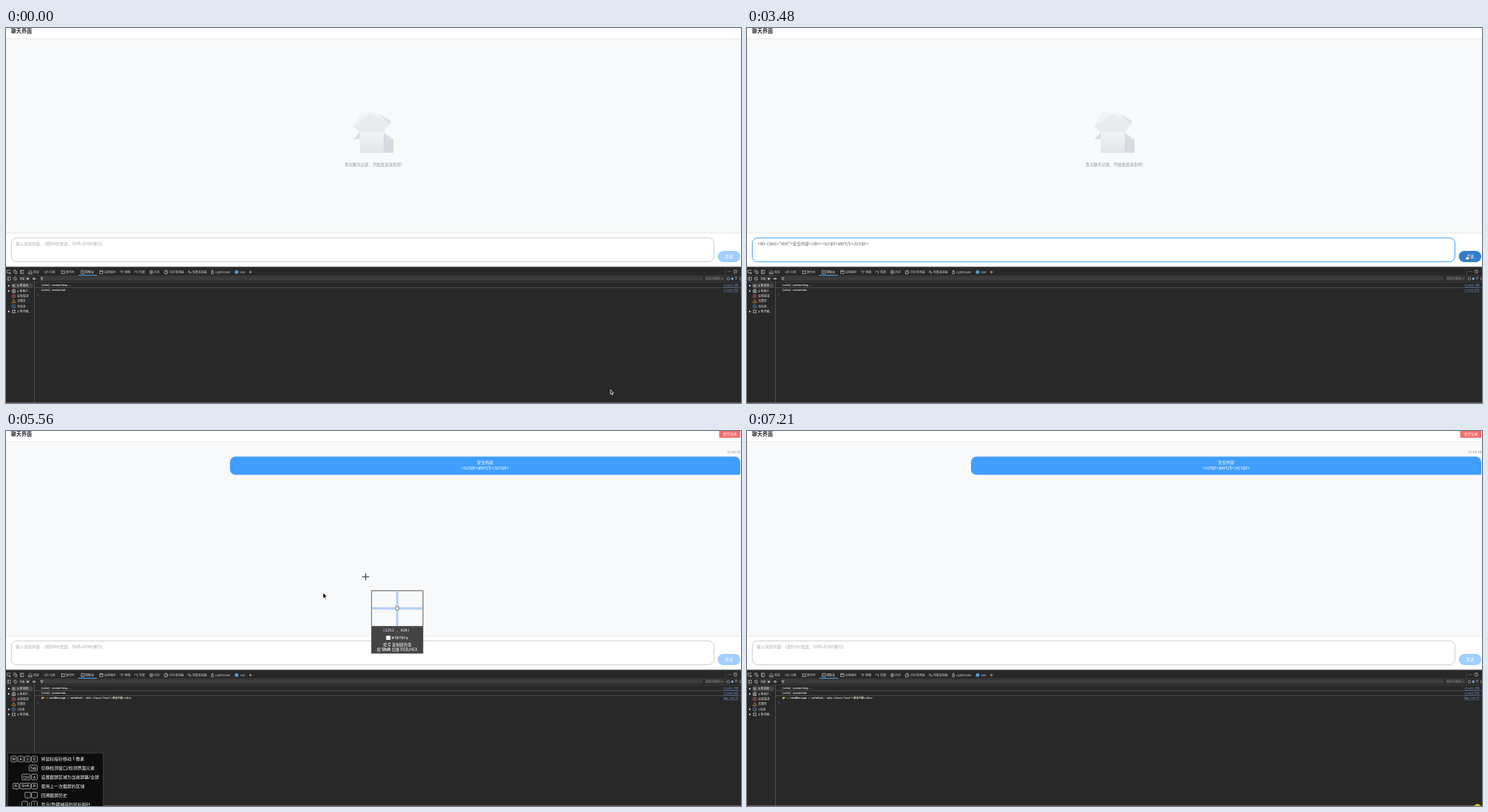
Write an HTML page that moves like this. It is 1047 px wide and 535 px high and loops after 7280 ms.

```html
<!DOCTYPE html>
<html lang="zh-CN">
<head>
<meta charset="utf-8">
<title>聊天界面</title>
<style>
html, body { margin: 0; width: 100%; height: 100%; overflow: hidden; background: #fff; }
svg { display: block; width: 100vw; height: 100vh; }
text { font-family: Inter, "Noto Sans CJK SC", "Noto Sans CJK", sans-serif; white-space: pre; }
.mono { font-family: "DejaVu Sans Mono", "Noto Sans CJK SC", "Noto Sans CJK", monospace; }
</style>
</head>
<body>
<svg id="stage" viewBox="0 0 1047 535" preserveAspectRatio="none"></svg>
<script>
const LOOP = 7280, FOCUS = 850, PASTE = 1600, SEND = 3640, SNAP = 5480, SNAP_END = 6490;

// Markup helpers
const esc = s => s.replace(/&/g, '&amp;').replace(/</g, '&lt;');
const rect = (x, y, w, h, fill, more = '') =>
  `<rect x="${x}" y="${y}" width="${w}" height="${h}" fill="${fill}" ${more}/>`;
const text = (x, y, size, fill, s, more = '') =>
  `<text x="${x}" y="${y}" font-size="${size}" fill="${fill}" ${more}>${esc(s)}</text>`;
const path = (d, stroke, more = '') =>
  `<path d="${d}" fill="none" stroke="${stroke}" stroke-width=".7" ${more}/>`;
const poly = (points, fill) => `<polygon points="${points}" fill="${fill}"/>`;
const ring = (x, y, r, stroke) =>
  `<circle cx="${x}" cy="${y}" r="${r}" fill="none" stroke="${stroke}" stroke-width=".7"/>`;
const group = (id, body) => `<g id="${id}">${body}</g>`;
const MID = 'text-anchor="middle"', END = 'text-anchor="end"', BOLD = 'font-weight="700"';
const MONO = 'class="mono"', MEDIUM = 'font-weight="500"';
const ICON = '#c3c3c3', BLUE = '#7cacf8';

function page() {
  return rect(0, 0, 1047, 341, '#fff') +
    rect(0, 15, 1047, 278, '#f8f9fa') +
    rect(0, 15, 1047, .8, '#e2e5e9') + rect(0, 292, 1047, .8, '#e2e5e9') +
    text(7, 7, 7.5, '#2b2f36', '聊天界面', BOLD) +
    rect(7.5, 299.5, 1001, 34, '#fff', 'id="field" rx="7.5"') +
    text(14, 310.2, 5.73, '#a5a8ae', '输入消息内容... (按Enter发送，Shift+Enter换行)', 'id="hint"') +
    text(14.5, 310.2, 5.78, '#606266',
      '<div class="test">安全内容</div><script>alert(1)<\/script>', 'id="draft"') +
    rect(14, 304.5, .8, 7.5, '#333', 'id="caret"') +
    rect(1014, 318, 32, 16, '#a0cfff', 'id="button" rx="8"') +
    text(1030, 328.1, 5.73, '#fff', '发送', MID);
}

function emptyBox() {
  return poly('494,140 508,119 537,124 548,132 546,139 538,149 504,149', '#f1f2f4') +
    poly('495,140 519,123 548,135 538,149 504,149', '#eaebee') +
    poly('532,124 548,132 548,137 541,133', '#e0e2e7') +
    poly('504,149 495,159 504,158', '#d9dbe1') +
    poly('538,149 552,159 552,178 538,178', '#dee0e6') +
    poly('538,149 543,159 552,159 552,178 538,178', '#d8dae1') +
    rect(504, 148.5, 34, 29.5, 'url(#front)') +
    text(525, 196.6, 5.68, '#909399', '暂无聊天记录，开始发送消息吧！', MID);
}

function message() {
  return rect(1016, -3, 30, 12.7, '#f56c6c', 'rx="1.5"') +
    text(1031, 6.4, 5, '#fff', '清空记录', MID + ' ' + MEDIUM) +
    text(1046.3, 32, 4.6, '#909399', '12:40:38', END) +
    '<path d="M327 36.5H1038a8 8 0 0 1 8 8V60.5a2 2 0 0 1-2 2H327a8 8 0 0 1-8-8V44.5a8 8 0 0 1 8-8z" fill="#409eff"/>' +
    text(682.5, 47.2, 5.8, '#fff', '安全内容', MID) +
    text(682.5, 55.4, 5.9, '#fff', '<script>alert(1)<\/script>', MID);
}

function tabs() {
  const list = [[39, '欢迎'], [62, '元素'], [85, '源代码'], [113, '控制台'], [140, '应用程序'],
    [169, '网络'], [190, '性能'], [211, '内存'], [233, '内存检测器'], [265.5, '性能监视器'],
    [298, 'Lighthouse'], [333, 'Vue']];
  const icons = [
    'M6 346.5v-1H1.500v4h2M4 348l3 2-1.500.3-.5 1z', 'M11 349v-3.500h3v1M13 347.500h2.500v3H13z',
    'M20.500 345.500h4.500v5h-4.500zM22 345.500v5', 'M32 348l2.500-2.500 2.500 2.500v3h-1.700v-2h-1.600v2H32z',
    'M56 346.500l-1.500 1.700 1.500 1.700M59 346.500l1.500 1.700-1.500 1.700M58 346l-1 4.500',
    'M79.500 346.500h3.500v4h-3.500zM78 346l1.500 1M78 350.500l1.500-1M84.500 346l-1.500 1M84.500 350.500l-1.500-1',
    'M107 346h4.500v4.500H107zM108.300 347.300l1.200 1-1.200 1', 'M133.500 346h4.500v4.500h-4.500zM133.500 347.500h4.500',
    'M162.500 347.500q2.500-2 5 0M163.700 349q1.300-1 2.600 0M165 350.500v.3',
    'M183 349q1-4 3-1.500 1 2 2-1M186 349l2 1', 'M207 346.800v3M205.500 348.300h3',
    'M228 346v2.300h2M225.500 350.500h2', 'M258.500 348.500h1.200l1-2.500 1.500 4.500 1-2h1.500',
    'M292.500 350.800h3l-.5-3h-2zM293 347.500v-1.500h2v1.500', 'M346 348.200h4.500M348.200 346v4.500'];
  return path(icons.join(''), ICON) + ring(207, 348.3, 2.4, ICON) + ring(228, 348.3, 2.6, ICON) +
    '<circle cx="328.5" cy="348.2" r="2.6" fill="#4a9bd5"/>' +
    list.map(([x, s]) => text(x, 349.9, 4.08, s === '控制台' ? '#fff' : '#d0d0d0', s)).join('') +
    rect(103, 352, 26.500, 1.200, '#3f9be8');
}

function toolbar() {
  return rect(48, 354.6, 945, 6, '#3c3c3c', 'rx="2.5"') +
    rect(18.5, 354.6, 16.5, 6, '#3c3c3c', 'rx="1"') +
    rect(995, 354.6, 28, 6, '#3c3c3c', 'rx="1"') +
    text(20, 359.1, 4.1, '#e4e4e4', 'top') + poly('29,356.700 33,356.700 31,359.500', '#e4e4e4') +
    path('M2 355.500h4.500v4.500H2zM3.500 355.500v4.500M11.500 356l3.200 3.500M49 356h4l-1.500 1.800v1.500h-1v-1.500z', ICON) +
    ring(13, 357.7, 2.3, ICON) +
    path('M37.500 357.700q2.500-3 5 0-2.500 3-5 0z', ICON) + ring(40, 357.7, .7, ICON) +
    text(996.5, 359.3, 4.05, '#8b8b8b', '自定义级别') + path('M1018.500 357l1.300 1.300 1.300-1.300', '#8b8b8b') +
    ring(1029, 357.7, 2, ICON) + rect(1033.2, 356, 3, 3.4, BLUE, 'rx=".8"') +
    text(1038, 359.4, 4.3, '#e4e4e4', '17') + ring(1047, 357.7, 2, ICON) +
    rect(1024.7, 342, .6, 20, '#555') +
    [1028, 1030, 1032].map(x => rect(x, 347, .8, .8, ICON)).join('') +
    ring(1039, 347.5, 2.4, ICON) + text(1039, 349, 3.8, ICON, '?', MID);
}

const rowY = i => 367.700 + i * 7.340;
const triangle = y => poly(`3,${y - 1.6} 3,${y + 1.6} 5.600,${y}`, '#d8d8d8');
const sideText = (i, s) => text(16, rowY(i) + 1.7, 4.05, '#f0f0f0', s, MEDIUM);

function sidebar() {
  const [a, b, c, d, e, f] = [0, 1, 2, 3, 4, 5].map(rowY);
  return rect(7, a - 3.5, 31.500, 7, '#46464a', 'rx="3"') +
    path(`M9 ${a - 1.5}h4M9 ${a}h4M9 ${a + 1.5}h4M8.700 ${b + 2.2}q2.300-4 4.600 0z`, ICON) +
    ring(11, b, 2.5, ICON) + ring(11, b - .8, .8, ICON) +
    ring(11, c, 2.4, '#e46962') + path(`M10 ${c - 1}l2 2m0-2l-2 2`, '#e46962') +
    path(`M11 ${d - 2.2}l2.600 4.400h-5.200z`, '#e8a13c') +
    ring(11, e, 2.4, '#5f9fe0') + path(`M11 ${e - .4}v1.600`, '#5f9fe0') +
    path(`M9.500 ${f - 2}h3v4h-3zM8 ${f - 2}l1.500 1M8 ${f + 2}l1.500-1M14 ${f - 2}l-1.500 1M14 ${f + 2}l-1.500-1`, ICON) +
    [a, b, f].map(triangle).join('') +
    sideText(2, '没有错误') + sideText(3, '无警告') + sideText(5, '2 条详细...');
}

const log = (i, x, s, link) => {
  const y = 368 + i * 7.2;
  return text(x, y, 3.58, '#f3eedd', s, MONO + ' ' + BOLD) +
    text(1043.5, y, 3.58, BLUE, link, `${MONO} ${END} text-decoration="underline"`);
};
const prompt = y => path(`M44.500 ${y - 1.3}l1.300 1.300-1.300 1.300`, '#6f87b0');
const counts = list => list.map((s, i) => sideText([0, 1, 4][i], s)).join('');

function devtools() {
  return rect(0, 341, 1047, 194, '#282828') +
    rect(0, 340.5, 1047, .8, '#4a4d50') + rect(0, 353.2, 1047, .6, '#4a4a4a') +
    rect(0, 362, 1047, .6, '#4a4a4a') + rect(40.200, 362, .8, 172, '#5a5a5a') +
    rect(41, 370.2, 1006, .7, '#5c5f62') + rect(0, 534, 1047, 1, '#6a5c60') +
    tabs() + toolbar() + sidebar() +
    log(0, 50, '[vite] connecting...', 'client:789') + log(1, 50, '[vite] connected.', 'client:912');
}

function logged() {
  return rect(41, 377.3, 1006, .7, '#5c5f62') +
    rect(50.500, 379.700, 2.800, 2.600, '#f2c14a', 'rx="1"') + rect(52.500, 379.800, 2.500, 1, '#f2c14a', 'rx=".5"') +
    log(2, 57, '→ sendMessage → safeHtml: <div class="test">安全内容</div>', 'App.vue:27') +
    prompt(387.8) + triangle(rowY(4)) + counts(['3 条消息', '3 条用户...', '1 信息']);
}

function shortcuts() {
  const key = (x, w, y, s) =>
    rect(x, y - 4, w, 8, '#0c0c0c', 'rx="1" stroke="#d8d8d8" stroke-width=".7"') +
    text(x + w / 2, y + 1.9, 5.3, '#fff', s, MID);
  const rows = [
    ['将鼠标指针移动 1 像素', [7, 8, 'W'], [17, 8, 'A'], [26.7, 8, 'S'], [36.5, 8, 'D']],
    ['切换检测窗口/检测界面元素', [33, 11.5, 'Tab']],
    ['设置截屏区域为当前屏幕/全屏', [22.7, 12, 'Ctrl'], [36.5, 8, 'A']],
    ['使用上一次截屏的区域', [10, 8, 'R'], [19.7, 15.300, 'Shift'], [36.5, 8, 'R']],
    ['回溯截屏历史', [27, 8, ','], [36.5, 8, '.']],
    ['显示/隐藏捕获的鼠标指针', [22.7, 8, '`'], [36.5, 8, '!']]];
  return rect(2.5, 459.5, 136, 80, '#0d0d0d', 'stroke="#444" stroke-width=".8"') +
    rows.map(([label, ...keys], i) => {
      const y = 468 + i * 12.85;
      return text(50, y + 2.3, 6.2, '#fff', label) + keys.map(([x, w, s]) => key(x, w, y, s)).join('');
    }).join('') + text(33.6, 534, 6, '#fff', '/', MID);
}

// Drawn around the crosshair at 0,0
function picker() {
  return path('M-5 0H5M0-5V5', '#55585c', 'style="stroke-width:1.5"') +
    rect(8, 19.5, 74, 90, '#434343') +
    rect(8.500, 20, 73, 50.5, '#f8f9fa', 'id="lens" stroke="#777" stroke-width=".9"') +
    rect(43.300, 20.500, 3.300, 49.500, '#b3cff6') + rect(9, 43.400, 72, 3.300, '#b3cff6') +
    rect(42.800, 42.800, 4.400, 4.400, '#fff', 'stroke="#777" stroke-width=".9"') +
    text(43.500, 78.300, 5.3, '#fff', '', `id="coords" ${MONO} ${MID}`) +
    rect(29.200, 84, 6, 6, '#f8f9fa', 'id="swatch"') +
    text(37, 88.900, 5.6, '#fff', '', `id="hex" ${MONO}`) +
    `<text x="45" y="99" font-size="5.5" fill="#fff" ${MID}>按 <tspan ${BOLD}>C</tspan> 复制颜色值</text>` +
    `<text x="45" y="106.300" font-size="5.5" fill="#fff" ${MID}>按 <tspan ${BOLD}>Shift</tspan> 切换 RGB/HEX</text>`;
}

const arrow = more => `<path d="M0 0V6.400L1.500 5.100 2.500 7.500 3.500 7.100 2.500 4.700H4.500z" stroke="#fff" stroke-width=".7" ${more}/>`;
const pointers = {
  arrow: arrow('fill="#222"'),
  beam: path('M-1.600-3.500H1.600M0-3.500V3.500M-1.600 3.500H1.600', '#333'),
  hand: '<path d="M-1.500-3.500q1-.8 1.300.2V-1l2.700.8q.8.5.5 2L2 4H-1.500L-3.500 1q0-1 1-.6l1 .6z" fill="#fff" stroke="#222" stroke-width=".7"/>',
  blocked: '<circle r="3.400" fill="#fff" stroke="#222" stroke-width="1.300"/>' +
    path('M-2.300-2.300L2.300 2.300', '#222', 'style="stroke-width:1.3"')
};

stage.innerHTML =
  '<defs><linearGradient id="front" x2="0" y2="1"><stop stop-color="#f2f3f5"/><stop offset="1" stop-color="#e3e4e9"/></linearGradient></defs>' +
  page() + devtools() +
  group('before', emptyBox() + prompt(380.5) + counts(['2 条消息', '2 条用户...', '无信息'])) +
  group('after', message() + logged()) +
  group('snap', shortcuts() + `<g transform="translate(451.500 230.500) scale(1.35)">${arrow('fill="#000"')}</g>` +
    group('picker', picker())) +
  group('pointer', Object.keys(pointers).map(k => group(k, pointers[k])).join('')) +
  '<circle id="glow" cx="1040.500" cy="537" r="5" fill="#c9c31e"/>';

const $ = id => document.getElementById(id);
const show = (id, on) => { $(id).style.display = on ? '' : 'none'; };
const set = (id, name, value) => $(id).setAttribute(name, value);

// Each move: start, end, steps, target x, y, optional control point of a curve
const mouse = [
  [70, 790, 11, 88, 308, 200, 228], [850, 1120, 4, 89, 310], [1260, 1520, 5, 330, 386],
  [1600, 2270, 11, 1025, 330], [2410, 2590, 3, 1026, 328], [3280, 3700, 6, 1026, 326],
  [3950, 4550, 10, 670, 51], [5030, 5290, 5, 443, 238], [5360, 5430, 2, 451, 231]];
const cross = [[5480, 5890, 6, 819, 93], [5950, 6160, 4, 934, 112, 885, 56], [6230, 6420, 4, 960, 480]];

function follow(t, x, y, moves, ease) {
  for (const [start, end, n, tx, ty, cx = (x + tx) / 2, cy = (y + ty) / 2] of moves) {
    if (t < start) break;
    const k = Math.floor((t - start) / (end - start) * (n - 1) + .01) + 1;
    const p = ease(Math.min(1, k / n)), q = 1 - p;
    x = q * q * x + 2 * p * q * cx + p * p * tx;
    y = q * q * y + 2 * p * q * cy + p * p * ty;
  }
  return [x, y];
}
const smooth = p => p * p * (3 - 2 * p), linear = p => p;
const inside = (x, y, l, t, r, b) => x >= l && x <= r && y >= t && y <= b;
const within = (t, a, b) => t >= a && t < b;

function buttonColor(t, hover) {
  if (t >= SEND) {
    const p = Math.min(1, (t - SEND) / 100), mix = (a, b) => Math.round(a + (b - a) * p);
    return `rgb(${mix(51, 160)},${mix(126, 207)},${mix(204, 255)})`;
  }
  if (t < PASTE) return '#a0cfff';
  return t >= 3400 ? '#337ecc' : hover ? '#79bbff' : '#409eff';
}

function draw(t) {
  const sent = t >= SEND, pasted = within(t, PASTE, SEND), focused = within(t, FOCUS, SEND);
  const [x, y] = follow(t, 861, 516, mouse, smooth);
  const onButton = inside(x, y, 1014, 318, 1046, 334);
  const onText = inside(x, y, 8, 300, 1008, 333) || (sent && inside(x, y, 648, 40, 717, 58));
  const kind = onButton ? (sent ? 'blocked' : 'hand') : onText ? 'beam' : 'arrow';

  show('before', !sent);
  show('after', sent);
  show('hint', !pasted);
  show('draft', pasted);
  show('caret', within(t, FOCUS, 1350) || within(t, 1750, 2270) || within(t, 2790, 3280));
  set('caret', 'x', pasted ? 177 : 14);
  set('field', 'stroke', focused ? '#409eff' : '#c9ccd2');
  set('button', 'fill', buttonColor(t, onButton));

  show('pointer', t < SNAP);
  set('pointer', 'transform', `translate(${x} ${y})`);
  for (const k in pointers) show(k, k === kind);

  show('snap', within(t, SNAP, SNAP_END));
  const [px, py] = follow(t, 451, 231, cross, linear);
  const color = py < 341 ? '#f8f9fa' : '#282828';
  set('picker', 'transform', `translate(${px} ${py})`);
  $('coords').textContent = `(${Math.round(px * 2.4408)} , ${Math.round(py * 2.4408 + 118)})`;
  $('hex').textContent = color;
  set('lens', 'fill', color);
  set('swatch', 'fill', color);
  show('glow', t >= 7210);
}

function tick() {
  draw(performance.now() % LOOP);
  requestAnimationFrame(tick);
}
tick();
</script>
</body>
</html>
```
